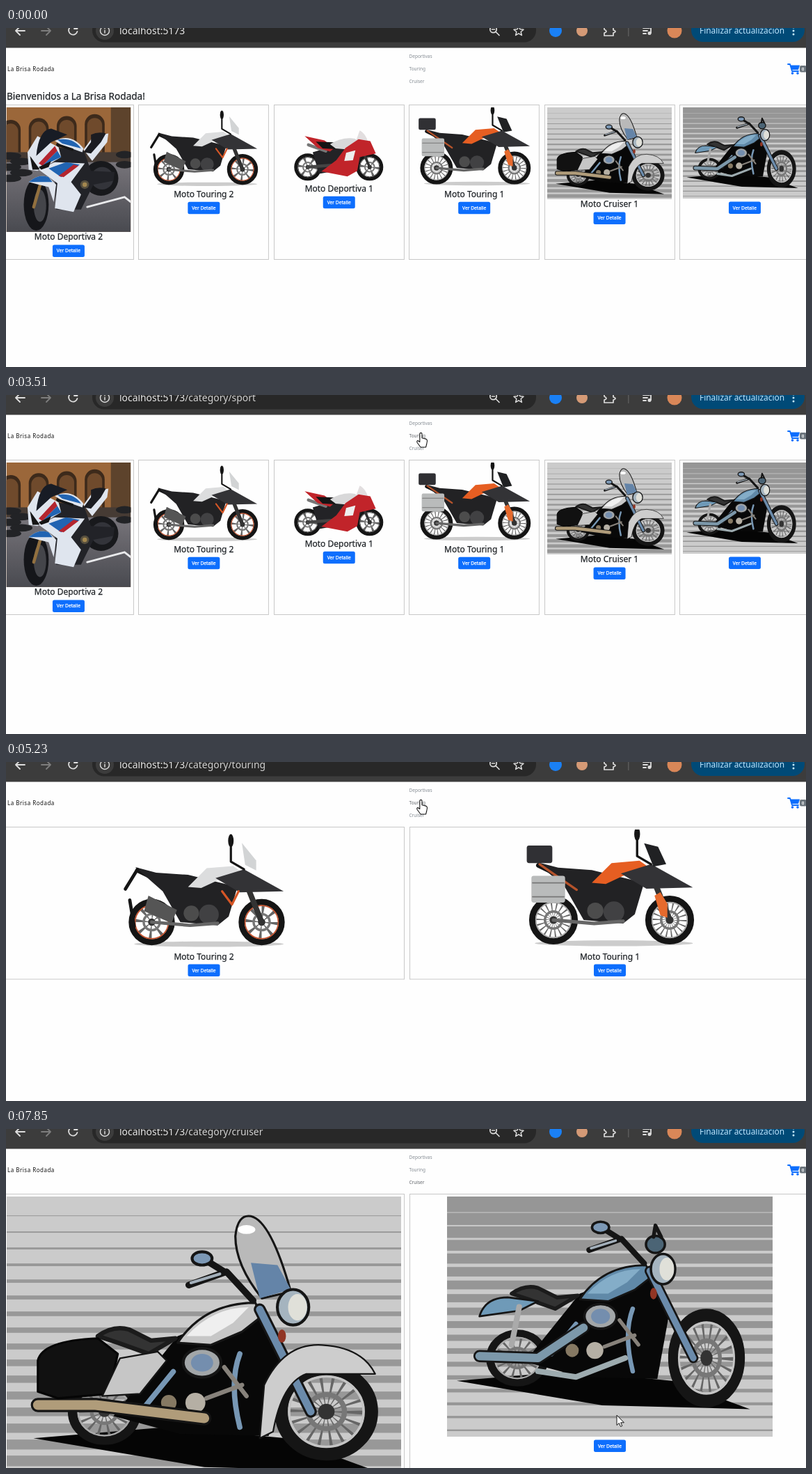
An HTML page for the animation above (8 s loop, 1150 by 487 pixels).

```html
<!DOCTYPE html>
<html lang="es">
<head>
<meta charset="utf-8">
<title>Motos</title>
<style>
html,body{margin:0;width:100%;height:100%;overflow:hidden;background:#fefefe}
svg{display:block}
#stage{width:100%;height:100%}
text{font-family:"Noto Sans","Open Sans",sans-serif;white-space:pre}
</style>
</head>
<body>
<svg id="stage" viewBox="0 0 1150 487"></svg>
<script>
const K = '#151515', BLUE = '#0d6efd', ICON = '#ddd';
const shape = (d, fill) => `<path d="${d}" fill="${fill}"/>`;
const line = (d, stroke = K, w = 2, fill = 'none') =>
  `<path d="${d}" fill="${fill}" stroke="${stroke}" stroke-width="${w}" stroke-linecap="round" stroke-linejoin="round"/>`;
const rect = (x, y, w, h, fill, rx = 0, more = '') =>
  `<rect x="${x}" y="${y}" width="${w}" height="${h}" rx="${rx}" fill="${fill}" ${more}/>`;
const oval = (x, y, rx, ry, fill, more = '') =>
  `<ellipse cx="${x}" cy="${y}" rx="${rx}" ry="${ry}" fill="${fill}" ${more}/>`;
const disc = (x, y, r, fill, more) => oval(x, y, r, r, fill, more);
const text = (x, y, size, s, fill = '#212529', more = '') =>
  `<text x="${x}" y="${y}" font-size="${size}" fill="${fill}" ${more}>${s}</text>`;
const strong = (x, y, size, s, fill, w) =>
  text(x, y, size, s, fill, `text-anchor="middle" stroke="${fill}" stroke-width="${w}"`);
const group = (id, body) => `<g id="${id}">${body}</g>`;
const repeat = (n, fn) => Array.from({length: n}, (_, i) => fn(i)).join('');
const edged = `stroke="${K}" stroke-width="1.3"`;

function wheel(x, r, rim, spokes, squash = 1) {
  const ring = (k, w, c, more = '') =>
    `<circle r="${r * k}" fill="none" stroke="${c}" stroke-width="${r * w}" ${more}/>`;
  return `<g transform="translate(${x}) scale(${squash} 1)">` +
    ring(.4, .7, '#666', `pathLength="${spokes}" stroke-dasharray=".25 .75"`) +
    ring(.87, .26, K) + ring(.72, .05, rim) + ring(.35, .1, '#777') + disc(0, 0, r * .16, '#333') + '</g>';
}

// Rear axle at 0,0 and front axle at 100,0.
const bike = (x, y, base, body) => `<g transform="translate(${x} ${y}) scale(${base / 100})">${body}</g>`;

const superbike = () =>
  rect(0, 0, 100, 100, '#9b673a') + rect(84, 0, 16, 40, '#5d432c') +
  repeat(4, i => [[8, 6, '#3d2a1b'], [6, 9, '#6f4a2c']].map(([r, y, c]) =>
    rect(3.5 + 22.5 * i - r, y + 4 - 1.5 * i, 2 * r, 40, c, r)).join('')) +
  rect(0, 36, 100, 9, '#463b34') + rect(0, 44, 100, 56, 'url(#road)') +
  repeat(5, i => oval(3 + 9 * (i % 2), 39 + 4.5 * i, 9, 3, '#222326')) + repeat(2, i => oval(95, 38 + 8 * i, 7, 3, '#222326')) +
  line('M65 80L95 72 100 76', '#e9eaec', 1.6) +
  disc(76, 57, 14, '#18191c') + disc(77, 57, 9, '#33343a') +
  oval(24, 78, 10, 21, '#15161a') + oval(27, 79, 5, 13, '#44454a') + line('M29 56L22 80', '#92703f', 2.5) +
  shape('M38 32L62 34 68 51 87 52 86 59 70 62 60 82 40 82Z', '#222328') +
  shape('M62 34L70 23 82 21 81 28 69 43Z', '#dfe5ee') + shape('M62 36L68 28V22Q74 19 80 21L76 28 68 37Z', '#1b1c21') +
  shape('M39 27Q52 20 62 33L61 36 44 30Z', '#dfe5ee') + shape('M41 26Q54 24 60 33L45 29Z', '#2164b2') +
  line('M41 30L53 34', K, 2) +
  shape('M17 36L25 23 42 32 44 40 25 51 18 50Z', '#dfe5ee') +
  shape('M24 39Q26 18 36 17L49 22 36 28Z', '#181c25') + shape('M19 39L21 50H27Z', K) +
  shape('M26 45L39 31 41 35 29 47Z', '#b4252f') + shape('M29 47L41 35 44 40 33 45Z', '#2164b2') +
  shape('M26 50L39 44 63 45 52 60 60 70 54 84 39 81 41 61Z', '#dfe5ee') +
  shape('M26 48L36 43 34 48 28 50Z', K) +
  shape('M34 49L48 44 59 46 44 56Z', '#2164b2') + shape('M42 55L54 46 58 47 46 56Z', '#b4252f') +
  disc(63, 62, 3.5, '#57503f') + disc(63, 62, 1.8, '#a3874f') +
  shape('M18 60Q26 53 34 56L40 62 38 76 34 64 26 62Z', '#dfe5ee') + shape('M18 60Q26 53 34 56L37 60Z', '#2164b2');

const sport = () =>
  wheel(0, 22, '#444', 6) + wheel(100, 22, '#444', 6) + line('M86 -32L100 0', '#333', 4) +
  shape('M8 -24L42 -34 90 -25 80 0 18 11Z', '#232326') + line('M0 0L38 -3', '#444', 5) + line('M1 -36L29 -26', '#777', 5) +
  shape('M-5 -50L27 -43 43 -31 36 -25 16 -31Z', '#c1242a') + shape('M13 -41L42 -40 45 -29 24 -30Z', K) +
  shape('M36 -37Q55 -49 76 -46L87 -39 71 -28 45 -30Z', '#d8d8d9') + shape('M77 -40L84 -59Q92 -56 98 -40Z', '#e2dedf') +
  shape('M61 -31L82 -45 101 -42 110 -22 84 -16 80 6 64 15 22 7 46 -11Z', '#c1242a') +
  shape('M62 -23L77 -27 73 -11 59 -10Z', '#eee');

const adventure = (tank, rim, spokes, extras) =>
  oval(52, 20, 68, 2.5, '#ccc') + wheel(0, 21, rim, spokes) + wheel(100, 21, rim, spokes) +
  line('M86 -35L100 0', '#333', 5) + line('M-13 -47L26 -28', K, 4) +
  shape('M-15 -50L4 -45 33 -43 78 -32 70 -5 60 3 26 0 10 -28Z', '#222224') +
  disc(52, -7, 9, '#414143') + disc(36, -8, 7, '#4c4c4c') + line('M0 0L35 3 60 1', '#666', 3) +
  shape('M33 -32L50 -49 74 -51 84 -44 60 -38 45 -31Z', tank) + shape('M58 -40L84 -48 120 -28 80 -27Z', '#333336') +
  line('M72 -68V-55L84 -48', K, 2) + oval(72, -74, 2.5, 6, K) + extras;

const touringWhite = () => adventure('#dcddde', '#c6532e', 8,
  shape('M82 -72L95 -56V-47L85 -52Z', '#d2d4d5') + shape('M-3 -24L23 -11 18 1 -7 -10Z', '#555') +
  line('M64 -28L73 -16 79 -28', '#d65626', 2) + line('M-24 -30L-13 -48M-20 -20L-16 4', K, 3));

const touringOrange = () => adventure('#e65e22', '#aaa', 18,
  shape('M78 -66L90 -63 97 -48 86 -46Z', '#202123') + line('M-12 -48L20 -26', '#b5532b', 2) +
  rect(-23, -64, 22, 15, '#303034', 2) + rect(-19, -38, 29, 23, '#b9bbbb', 2) + line('M-18 -32H9M-18 -20H9', '#777', 1) +
  shape('M87 -21L92 -24 98 -14V-2L92 -4Z', '#e66a2d'));

const cruiser = (tank, shine, pipe, lamp, front, squash, extras) =>
  shape('M-32 12L28 7 82 12 123 27 45 25Z', '#050505') +
  wheel(0, 15, '#aaa', 14, 1.1) + wheel(100, front, '#c4c4c4', 18, squash) +
  shape('M4 2L33 -34 70 -48 80 -22 74 11 34 10Z', '#080808') +
  line('M18 -2L31 -18M61 7Q56 -13 61 -26', '#7797b4', 2.4) + line('M54 -20L64 -7M46 -6L62 -12', '#87827b', 2) +
  oval(44, -22, 8.5, 6.5, '#a2a6a8', edged) + oval(44, -22, 5, 4, '#748eae') +
  disc(41, -4, 4.5, '#b5afa4') + disc(29, -4, 3.5, '#867963') + line(pipe, K, 6.4) + line(pipe, shine, 4.4) +
  line('M-3 -34Q4 -39 11 -37L21 -32 32 -33 20 -26 6 -31Z', '#1b1b1b', 2, '#333') +
  line('M33 -31Q45 -49 68 -49L71 -43 62 -36 48 -30Z', K, 1, tank[0]) + shape('M37 -34Q49 -47 65 -47L58 -40 48 -34Z', tank[1]) +
  line('M70 -46L93 0', K, 5.4) + line('M70 -46L93 0', '#6b8bab', 3.4) +
  line('M38 -57L55 -63 67 -50M54 -63L46 -68', K, 3) + line('M39 -58L52 -62', '#a3afba', 1.3) +
  oval(44, -69, 4.5, 3, '#7c98b5', edged) + extras +
  oval(lamp, -47, lamp / 12, 8, '#a5b4bf', edged) + oval(lamp + 2, -47, lamp / 20, 6, '#e0e0d9') + oval(lamp - 5, -34, 1.8, 3, '#913524');

const cruiserWhite = () => cruiser(['#c7c7c7', '#efefef'], '#b09c7a', 'M-30 -3H-4L45 3', 85, 22, 1.06,
  line('M70 12L72 -12Q81 -31 98 -30 116 -29 122 -17H91Q80 -13 76 9Z', K, .7, '#cdcdcd') +
  line('M-30 -23Q-28 -32 -3 -33L6 -26 2 -8 -21 -6 -30 -9Z', '#050505', 1, '#111') +
  line('M7 -24L24 -27 28 -23 16 -8 -1 -7Z', K, .7, '#c6c6c6') +
  line('M59 -79Q60 -89 66 -88 75 -86 84 -54L71 -51Q59 -66 59 -79Z', K, 1, '#b9b9b9') + oval(64, -82, 4, 2, '#fff') +
  shape('M66 -67L78 -66 84 -55 70 -51Z', '#6484a8'));

const cruiserBlue = () => cruiser(['#6089a8', '#84adc8'], '#7c98aa', 'M-20 -1L11 0 35 -16', 77, 26, .78,
  line('M-20 -22Q-17 -32 -5 -32L11 -30 1 -25Z', K, 1, '#6f9ab8') + line('M1 -27L-3 -7', '#aaa', 3) +
  line('M11 7L31 10 57 0', '#9dabaf', 3) + oval(73, -60, 5, 4.5, '#4b6475', edged) + line('M72 -64L73 -70 76 -64', K, 2));

// Each band is a little thicker than the one above it.
const stripes = (w, h, back, fore, pitch, lift) => rect(-w / 2, 0, w, h, back) +
  repeat(18, i => rect(-w / 2, pitch * (i + 1.18) - lift * i, w, i * .95 + 1, fore));

const photo = `<g transform="translate(-279.5) scale(5.59)">${superbike()}</g>`;
const art = {
  superbike: {name: 'Moto Deportiva 2', w: 559, h: 559, zoom: .32, body: photo},
  touringWhite: {name: 'Moto Touring 2', w: 272, h: 175, zoom: .67, body: bike(-75, 133, 158, touringWhite())},
  sport: {name: 'Moto Deportiva 1', w: 229, h: 140, zoom: .78, body: bike(-57.6, 110, 114, sport())},
  touringOrange: {name: 'Moto Touring 1', w: 272, h: 175, zoom: .67, body: bike(-81, 130, 167, touringOrange())},
  cruiserWhite: {name: 'Moto Cruiser 1', w: 567, h: 418, zoom: .3157, body:
    stripes(567, 418, '#cbcbcb', '#989898', 23, 0) + bike(-143, 309, 319, cruiserWhite())},
  cruiserBlue: {name: '', w: 468, h: 345, zoom: .38, body:
    stripes(468, 345, '#969696', '#cbcbcb', 19, .5) + bike(-133, 232, 272, cruiserBlue())}
};
const clipArt = (id, {w, h, body}) => group(id,
  `<svg x="${-w / 2}" width="${w}" height="${h}" viewBox="${-w / 2} 0 ${w} ${h}">${body}</svg>`);

const button = (cx, y) => rect(cx - 23, y, 46, 17.5, BLUE, 2.5) + strong(cx, y + 11, 6.7, 'Ver Detalle', '#fff', .25);
const shelf = (ids, top, pitch, height, small) => ids.map((id, i) => {
  const {name, h, zoom} = art[id], k = small ? zoom : 1;
  const w = pitch - 7.5, x = Math.round(pitch * i - 4) + .5, cx = pitch * i - 3.5 + w / 2, end = top + 3.5 + h * k;
  return rect(x, top, w, height, 'none', 0, 'stroke="#c8c8c8"') +
    `<use href="#${id}" transform="translate(${cx} ${top + 3.5}) scale(${k})"/>` +
    strong(cx, end + 11.5, 12, name, '#212529', .25) + button(cx, end + (name ? 18.5 : 4.5));
}).join('');

const pages = {
  home: text(1, 103, 13.6, 'Bienvenidos a La Brisa Rodada!', '#212529', 'id="welcome" stroke="#212529" stroke-width=".25"') +
    shelf(Object.keys(art), 110.5, 194.4, 222, true),
  sports: shelf(['superbike', 'sport'], 93.5, 574.6, 600) + rect(1138, 29, 12, 458, '#424242') +
    rect(1139, 46, 11, 436, '#68696b') + shape('M1141 40H1149L1145 36Z', '#999'),
  tourings: shelf(['touringWhite', 'touringOrange'], 93.5, 583.5, 218.5),
  cruisers: shelf(['cruiserWhite', 'cruiserBlue'], 93.5, 583.5, 600)
};

const bar = rect(0, 0, 1150, 28.5, '#3c3c3c') + rect(124, -14, 638, 34.5, '#282828', 17) +
  line('M27 4H14M20 -2L14 4 20 10', ICON, 1.8) + line('M51 4H64M58 -2L64 4 58 10', '#7d7d7d', 1.8) +
  line('M101 -1A6.3 6.3 0 1 0 102.5 5M102.5 -4V1H98', ICON, 1.8) +
  disc(142, 4, 13, '#3c3c3c') + disc(142, 4, 6.5, 'none', `stroke="${ICON}" stroke-width="1.4"`) + line('M142 3.5V7M142 .8V1', ICON, 1.5) +
  text(163, 9, 13.9, 'localhost:5173<tspan id="path" fill="#d2d2d2"></tspan>', '#e8e8e8') +
  disc(700.5, 2, 4.7, 'none', `stroke="${ICON}" stroke-width="1.7"`) + line('M704 5.5L709 10.5M698.5 2H702.5', ICON, 1.7) +
  line('M' + repeat(10, i => {
    const a = i * Math.PI / 5, r = i % 2 ? 3.3 : 7.4;
    return `${737 + r * Math.sin(a)} ${4.5 - r * Math.cos(a)} `;
  }) + 'Z', ICON, 1.5) +
  disc(790, 4, 9, '#1a80f5') + disc(828, 4, 8, '#d59a76') +
  line('M860 -2H864Q866 -7 868 -2H873V3Q879 5 873 7V11H860V7Q866 5 860 2Z', ICON, 1.7) +
  rect(894, -4, 1.5, 16, '#5a5a5a') + line('M916 0H925M916 4H922M916 8H920M927 7V-1H930', ICON, 1.8) + disc(925, 7.5, 2.5, ICON) +
  disc(961, 4, 10.5, '#d98758') + rect(985, -14, 163, 34, '#004a77', 17) +
  text(997, 8, 11.9, 'Finalizar actualización', '#c2e7ff') + repeat(3, i => disc(1132, 5 * i - 1, 1.5, '#c2e7ff'));

const links = ['Deportivas', 'Touring', 'Cruiser'];
const head = text(2, 62, 8, 'La Brisa Rodada', '#111', 'letter-spacing=".5"') +
  group('nav', links.map((s, i) => text(579.5, 43 + 18 * i, 6.5, s)).join('')) +
  group('cart', line('M1124 52H1127L1130 62H1139', BLUE, 1.8) + shape('M1127 53.5H1141L1139 60H1129Z', BLUE) +
    disc(1130.5, 65, 1.8, BLUE) + disc(1138, 65, 1.8, BLUE) + rect(1141, 54, 9.5, 9.5, '#6c757d', 2) +
    strong(1145.7, 61, 5.6, '0', '#fff', .3));

const pointer = group('cursor',
  line('M0 0V14L3.3 11 5.5 16 7.8 15 5.7 10.3H10Z', K, 1, '#fff') +
  line('M-1.7 1.4C-1.7-.7 1.5-.7 1.5 1.4V7.2L7 8.6Q9 9.2 9 11.5L8.2 16 7 20.5H-.5L-5.3 14Q-6.6 11.7-4.5 11L-1.7 13Z', K, 1.1, '#fff'));

const $ = id => document.getElementById(id);
$('stage').innerHTML =
  '<defs><linearGradient id="road" x2="0" y2="1"><stop stop-color="#77747a"/><stop offset="1" stop-color="#494a50"/></linearGradient>' +
  Object.entries(art).map(([id, a]) => clipArt(id, a)).join('') + '</defs>' +
  rect(0, 0, 1150, 487, '#fefefe') + Object.entries(pages).map(([id, body]) => group(id, body)).join('') + head + bar + pointer;

// start, end, steps, then the resting point reached
const moves = [
  [450, 590, 3, 703, 458], [850, 1120, 5, 547, 282], [1320, 2100, 12, 602.5, 39.5],
  [3030, 3510, 8, 596.5, 54.5], [5560, 5840, 5, 596.5, 79.5], [7030, 7510, 8, 640.5, 150], [7710, 7850, 3, 878, 411.5]
];
function cursorAt(t) {
  let x = 1093, y = 489;
  for (const [a, b, n, tx, ty] of moves) {
    if (t < a) break;
    const step = Math.min(n, 1 + Math.floor((t - a) / (b - a) * (n - 1) + 1e-6));
    const k = 1 - (1 - step / n) ** 1.5;
    x += (tx - x) * k;
    y += (ty - y) * k;
  }
  return [x, y];
}

const show = (el, on) => el.setAttribute('display', on ? 'inline' : 'none');
const shift = (el, x, y) => el.setAttribute('transform', `translate(${x} ${y})`);

function draw(t) {
  const page = t < 4040 ? 'home' : t < 5230 ? 'sports' : t < 6700 ? 'tourings' : 'cruisers';
  for (const id in pages) show($(id), id === page);
  show($('welcome'), t < 2570);
  shift($('home'), 0, t < 2570 ? 0 : -17);
  $('path').textContent = t < 2570 ? '' : '/category/' + (t < 4700 ? 'sport' : t < 6100 ? 'touring' : 'cruiser');
  shift($('nav'), page === 'sports' ? -9 : 0, 0);
  shift($('cart'), page === 'sports' ? -18 : 0, 0);
  const active = t < 2100 ? -1 : t < 3510 ? 0 : t < 5840 ? 1 : 2;
  [...$('nav').children].forEach((el, i) => el.setAttribute('fill', i === active ? '#62666b' : '#858c93'));

  const [x, y] = cursorAt(t), cursor = $('cursor');
  const hand = x > 579 && x < 614 && y < 86;
  show(cursor, t >= 450);
  shift(cursor, x, y);
  show(cursor.children[0], !hand);
  show(cursor.children[1], hand);
}

const begin = performance.now();
function tick() {
  draw((performance.now() - begin) % 8000);
  requestAnimationFrame(tick);
}
draw(0);
requestAnimationFrame(tick);
</script>
</body>
</html>
```
